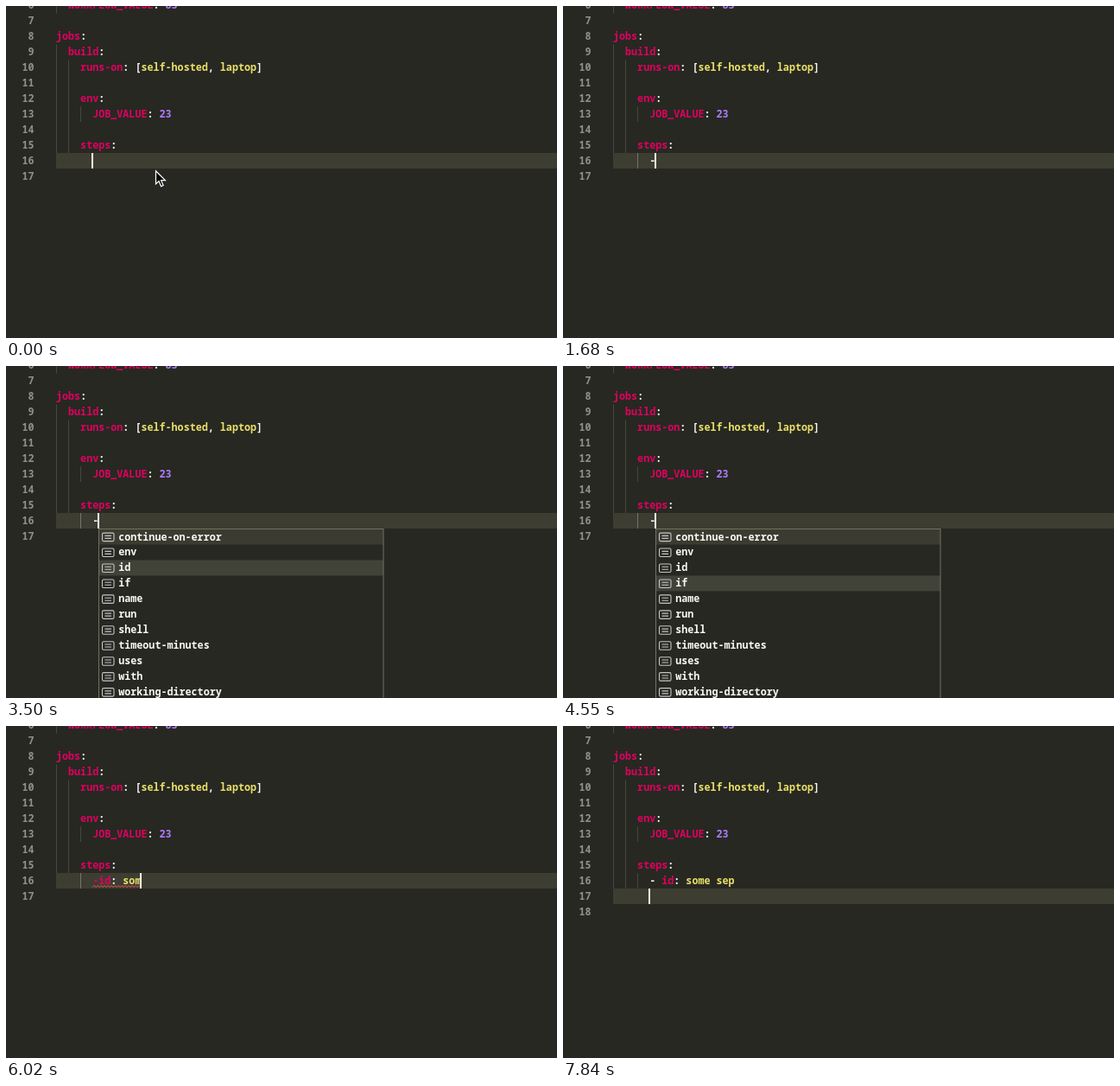
Recreate the animation shown at these times as an HTML page. Size 638 px wide and 384 px high, loop 8 s.

```html
<!DOCTYPE html>
<html lang="en">
<head>
<meta charset="utf-8">
<title>Workflow editor</title>
<style>
html, body { margin: 0; width: 100%; height: 100%; overflow: hidden; background: #272822; }
svg { display: block; }
text { font: 700 11.72px "Noto Sans Mono", "DejaVu Sans Mono", monospace; white-space: pre; fill: #f8f8f2; }
.num { fill: #90908a; font-weight: 600; text-anchor: end; }
.key { fill: #e0005f; }
.str { fill: #e9df68; }
.int { fill: #ae7cff; }
.abc { font: 10.5px "Open Sans", sans-serif; fill: #c5c5c5; }
.icon { fill: none; stroke: #c5c5c5; stroke-width: 1.1; }
</style>
</head>
<body>
<svg id="stage" width="638" height="384" viewBox="0 0 638 384"></svg>
<script>
const LOOP = 8000, CHAR = 7.03, ROW = 17.95, LEFT = 58;
const stage = document.getElementById('stage');

const code = {
  6: '  WORKFLOW_VALUE: 83',
  8: 'jobs:',
  9: '  build:',
  10: '    runs-on: [self-hosted, laptop]',
  12: '    env:',
  13: '      JOB_VALUE: 23',
  15: '    steps:'
};
const stepKeys = ['continue-on-error', 'env', 'id', 'if', 'name', 'run', 'shell',
  'timeout-minutes', 'uses', 'with', 'working-directory'];

const keyList = (sel, width = 430) => ({ col: 7, items: stepKeys, sel, width });
const wordList = (col, ...items) => ({ col, items, sel: 0, width: 430, words: true });

// Editor state changes; each one builds on those before it.
const start = { line: '', row: 16, col: 6, list: null, error: false, mouse: true };
const type = line => ({ line, col: 6 + line.length });
const changes = [
  [490, { ...type('-'), mouse: false }],
  [560, { list: keyList(0) }],
  [1330, { list: null }],
  [1820, { list: keyList(0) }],
  [2940, { list: keyList(1) }],
  [3220, { list: keyList(2, 330) }],
  [4200, { list: keyList(3, 330) }],
  [4620, { list: keyList(2, 330) }],
  [4760, { ...type('-id:'), list: null }],
  [5390, type('-id: ')],
  [5460, { error: true }],
  [5880, type('-id: s')],
  [5950, type('-id: so')],
  [6020, type('-id: som')],
  [6160, type('-id: some')],
  [6230, type('-id: some ')],
  [6370, type('-id: some s')],
  [6510, { ...type('-id: some se'), list: wordList(18, 'self-hosted', 'some', 'steps') }],
  [6650, { ...type('-id: some sep'), list: wordList(19, 'steps') }],
  [6720, { list: null }],
  [7350, { col: 7 }],
  [7420, { line: '- id: some sep', col: 8 }],
  [7560, { error: false }],
  [7770, { row: 17, col: 6 }]
];
const blinks = [1120, 1680, 2100, 2520, 3010, 3500, 3990, 4550, 5250, 5390, 7140, 7350];

const colX = col => LEFT + col * CHAR;
const rowY = row => 170 + (row - 16) * ROW;
const rect = (x, y, w, h, fill, extra = '') =>
  `<rect x="${x}" y="${y}" width="${w}" height="${h}" fill="${fill}" ${extra}/>`;
const text = (x, y, body, cls = '') => `<text class="${cls}" x="${x}" y="${y + 12.9}">${body}</text>`;
const span = (cls, body) => `<tspan class="${cls}">${body}</tspan>`;
const guide = (col, from, to, color = '#464741') =>
  rect(Math.round(colX(col)), rowY(from), 1, (to - from + 1) * ROW, color);

function highlight(line) {
  const [, dash = '', key, colon, value] = line.match(/^\s*(- |-$)?([^:]*)(:?)(.*)$/);
  const tokens = value.replace(/[\w-]+/g, word => span(/^\d+$/.test(word) ? 'int' : 'str', word));
  return dash + span('key', key) + colon + tokens;
}

function codeLine(row, line) {
  const indent = line.search(/\S|$/);
  return text(colX(indent), rowY(row), highlight(line));
}

function squiggle(x, y, width) {
  const waves = 'l2-2 2 2'.repeat(Math.round(width / 4));
  return `<path d="M${x} ${y}${waves}" fill="none" stroke="#f4544f"/>`;
}

function popup({ col, items, sel, width, words }) {
  const x = Math.round(colX(col)) + 0.5, top = 188;
  const height = words ? items.length * ROW : 220;
  let out = rect(x, top + 0.5, width - 0.5, height - 0.5, '#272822');
  items.forEach((item, i) => {
    const y = top + 0.6 + i * ROW;
    const fill = i === sel ? '#414339' : i === 0 && !words ? '#3c3b31' : '';
    if (fill) out += rect(x, y, width - 0.5, ROW, fill);
    out += words
      ? text(x + 3.5, y - 0.3, 'abc', 'abc')
      : `<g class="icon"><rect x="${x + 4}" y="${y + 4.5}" width="13.5" height="9.5" rx="1.5"/>
         <path d="M${x + 7} ${y + 7.8}h7.5m-7.5 3h7.5"/></g>`;
    out += text(x + 22.7, y, item);
  });
  return out + rect(x, top + 0.5, width - 0.5, height - 0.5, 'none', 'stroke="#75715e"');
}

function draw(state, caretOn) {
  const { line, row, col, list, error, mouse } = state;
  const y = rowY(row);
  let out = guide(0, 6, 6) + guide(0, 9, row - 1) + guide(2, 10, row - 1) + guide(4, 13, 13);
  out += rect(LEFT, y, 580, ROW, '#3e3d32');
  if (line) out += guide(4, 16, 16, row === 16 ? '#74756c' : '#464741');
  for (let n = 6; n <= row + 1; n++) out += text(32.5, rowY(n), n, 'num');
  for (const n in code) out += codeLine(n, code[n]);
  out += text(colX(6), rowY(16), highlight(line));
  if (error) out += squiggle(colX(6), rowY(16) + 16.5, line.length * CHAR);
  if (list) out += popup(list);
  if (caretOn) out += rect(Math.round(colX(col)) - 1, y, 2, ROW, '#f8f8f0');
  if (mouse) out += `<path d="M173.5 190.8v15l3.5-3.2 2.6 6 2.5-1.1-2.6-5.8h4.9z"
    fill="#000" stroke="#fff" stroke-width="1.2"/>`;
  return out;
}

let shown = '';
function tick(now) {
  const t = now % LOOP;
  const past = changes.filter(([at]) => at <= t);
  const flips = blinks.filter(at => at <= t).length;
  const id = past.length + '/' + flips;
  if (id !== shown) {
    shown = id;
    stage.innerHTML = draw(Object.assign({}, start, ...past.map(([, change]) => change)), flips % 2 === 0);
  }
  requestAnimationFrame(tick);
}
tick(0);
</script>
</body>
</html>
```
